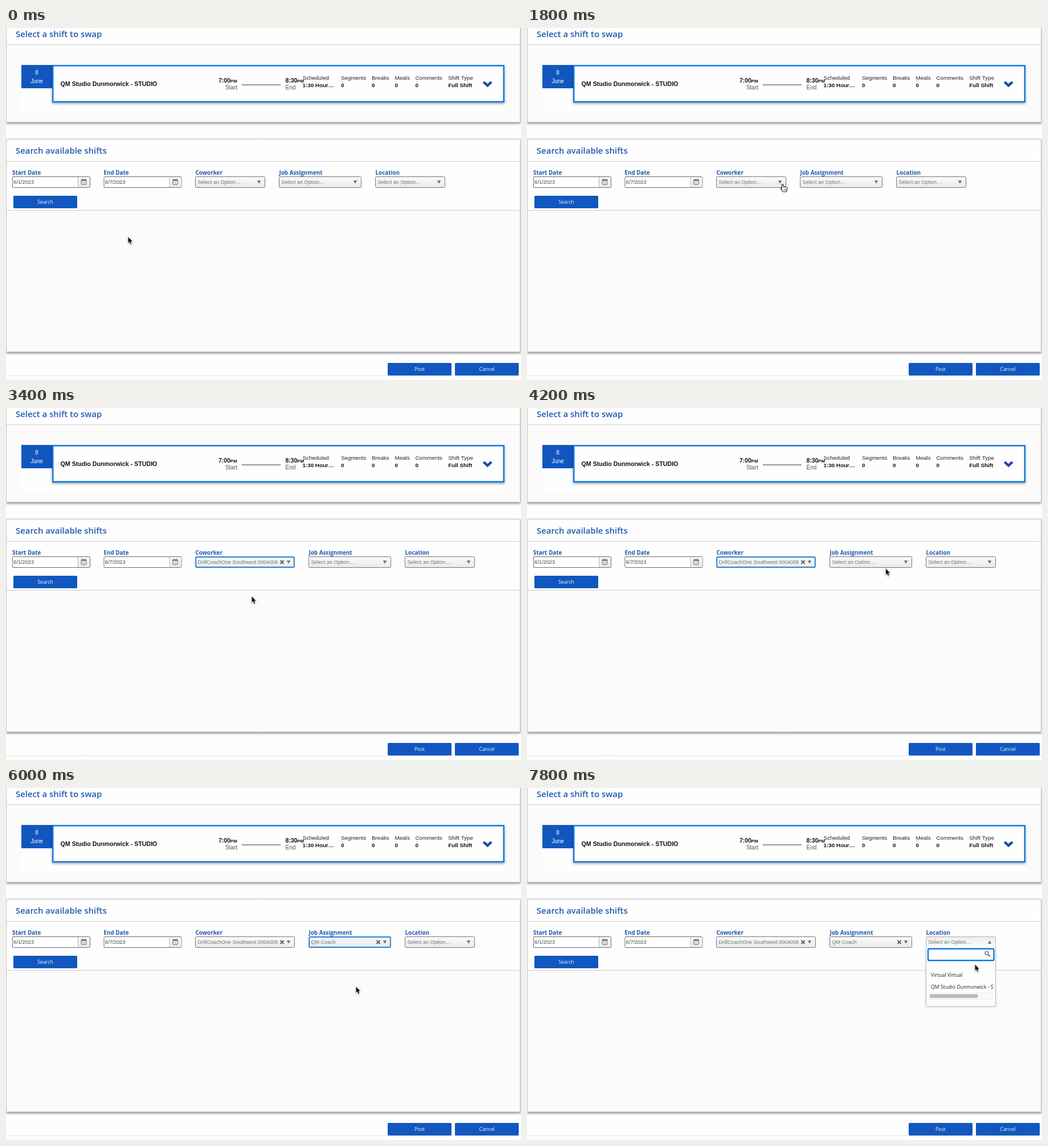
Write an HTML page with a canvas that moves like this. It is 904 px wide and 619 px high and loops after 8000 ms.

```html
<!DOCTYPE html>
<html lang="en">
<head>
<meta charset="utf-8">
<title>Shift swap</title>
<style>
html, body { margin: 0; width: 100%; height: 100%; overflow: hidden; background: #fefefe; }
canvas { display: block; width: 904px; height: 619px; }
</style>
</head>
<body>
<canvas id="stage"></canvas>
<script>
const W = 904, H = 619, LOOP = 8000, STEP = 200;
const canvas = document.getElementById('stage');
const ctx = canvas.getContext('2d');
const dpr = window.devicePixelRatio || 1;
canvas.width = W * dpr;
canvas.height = H * dpr;

const OPEN_SANS = '"Open Sans", "Noto Sans", sans-serif';
const ARIAL = '"Liberation Sans", Arial, sans-serif';
const BLUE = '#1157bf', FOCUS = '#0f7ae5', TITLE = '#2059b0';
const HINT = 'Select an Option…';

// When each list opens and when its option is picked
const TIMES = {
  coworker: { open: 2600, pick: 3400 },
  job: { open: 4400, pick: 6000 },
  place: { open: 7200, pick: LOOP }
};

// Pointer stops: time, x, y
const PATH = [
  [0, 214, 367], [1600, 449, 274], [1800, 449, 274], [2200, 448, 277], [2600, 448, 277],
  [3200, 431, 331], [3600, 431, 331], [4400, 666, 273], [5000, 666, 273],
  [5400, 614, 349], [6000, 614, 349], [7000, 812, 273], [7200, 812, 273], [7800, 786, 310]
];

function text(str, x, y, font, color, align = 'left') {
  ctx.font = font;
  ctx.fillStyle = color;
  ctx.textAlign = align;
  ctx.fillText(str, x, y);
}

function rect(x, y, w, h, color) {
  ctx.fillStyle = color;
  ctx.fillRect(x, y, w, h);
}

function box(x, y, w, h, r, fill, stroke, line = 1) {
  ctx.beginPath();
  ctx.roundRect(x, y, w, h, r);
  if (fill) { ctx.fillStyle = fill; ctx.fill(); }
  if (stroke) { ctx.strokeStyle = stroke; ctx.lineWidth = line; ctx.stroke(); }
}

function poly(points, fill, stroke, line = 1) {
  ctx.beginPath();
  points.forEach(([x, y]) => ctx.lineTo(x, y));
  if (fill) { ctx.closePath(); ctx.fillStyle = fill; ctx.fill(); }
  if (stroke) { ctx.strokeStyle = stroke; ctx.lineWidth = line; ctx.stroke(); }
}

function shade(y, h, top, bottom) {
  const g = ctx.createLinearGradient(0, y, 0, y + h);
  g.addColorStop(0, top);
  g.addColorStop(1, bottom);
  return g;
}

function shadowed(color, blur, dy, draw) {
  ctx.save();
  ctx.shadowColor = color;
  ctx.shadowBlur = blur * dpr;
  ctx.shadowOffsetY = dy * dpr;
  draw();
  ctx.restore();
}

function panel(y, bottom, headEnd, bodyStart, title, baseline) {
  shadowed('rgba(0,0,0,.45)', 4, 1.5, () => rect(0, y, 903, bottom - y, '#fefefe'));
  rect(0, bodyStart, 903, bottom - bodyStart, '#fbfbfb');
  box(.5, y + .5, 902, bottom - y - 1, 0, null, '#c4c4c4');
  rect(1, headEnd, 901, 1, '#cfcfcf');
  if (bodyStart !== headEnd) rect(1, bodyStart, 901, 1, '#cbcbcb');
  text(title, 17, baseline, `600 14.9px ${OPEN_SANS}`, TITLE);
}

function button(label, x, y, w = 112, h = 22) {
  box(x, y, w, h, 1.5, BLUE);
  text(label, x + w / 2, y + 14.2, `8.8px ${OPEN_SANS}`, '#f4f8ff', 'center');
}

function clock(time, x) {
  text(time, x, 96, `bold 10.3px ${ARIAL}`, '#111');
  text('PM', x + 20.6, 96, `bold 8px ${ARIAL}`, '#111');
}

function shiftCard() {
  rect(27, 66, 848, 81, '#fefefe');
  rect(27, 65, 54, 41, BLUE);
  text('8', 54, 82, `10px ${ARIAL}`, '#fff', 'center');
  text('June', 54, 97, `10px ${ARIAL}`, '#fff', 'center');

  shadowed('rgba(0,0,0,.4)', 4, 1.5, () => rect(81, 65, 794, 66, FOCUS));
  rect(83.5, 67.5, 789, 61, '#fefefe');
  text('QM Studio Dunmorwick - STUDIO', 95.5, 102, `bold 10.66px ${ARIAL}`, '#111');
  clock('7:00', 373);
  clock('8:30', 490.5);
  text('Start', 406, 107.5, `10px ${ARIAL}`, '#555', 'right');
  text('End', 490.5, 107.5, `10px ${ARIAL}`, '#555');
  rect(414, 99.5, 68, 1, '#333');

  const columns = [
    [520.5, 'Scheduled', '1:30 Hour…'], [588, 'Segments', '0'], [642, 'Breaks', '0'],
    [682.5, 'Meals', '0'], [718.5, 'Comments', '0'], [776.3, 'Shift Type', 'Full Shift']
  ];
  for (const [x, head, value] of columns) {
    text(head, x, 91, `9.8px ${ARIAL}`, '#222');
    text(value, x, 104, `bold 9.8px ${ARIAL}`, '#111');
  }
  poly([[838.3, 94.8], [845.2, 101.2], [852.1, 94.8]], null, '#1c4dab', 4.4);
}

function label(str, x) {
  text(str, x, 257.6, `bold 9.85px ${OPEN_SANS}`, TITLE);
}

function dateField(name, value, x) {
  label(name, x);
  box(x + .5, 261.5, 136, 19, 1.5, '#fefefe', '#6b6b6b');
  rect(x + 116, 262, 20, 18, shade(262, 18, '#f8f8f8', '#ebebeb'));
  rect(x + 115, 262, 1, 18, '#b5b5b5');
  text(value, x + 2.3, 274, `9.2px ${ARIAL}`, '#444');
  // calendar icon
  box(x + 121, 266.5, 9, 9, 1, '#f5f5f5', '#777');
  rect(x + 121, 267, 9, 2, '#777');
  rect(x + 122.5, 265, 1, 2, '#777');
  rect(x + 127.5, 265, 1, 2, '#777');
  for (let i = 0; i < 6; i++) {
    rect(x + 122.3 + (i % 3) * 2.4, 270.6 + (i > 2 ? 2.4 : 0), 1.5, 1.3, '#999');
  }
}

function triangle(x, y, dir) {
  poly([[x - 3.3, y - 2.7 * dir], [x + 3.3, y - 2.7 * dir], [x, y + 2.7 * dir]], '#707070');
}

function cross(x, y) {
  poly([[x - 3, y - 3], [x + 3, y + 3]], null, '#666', 2.2);
  poly([[x + 3, y - 3], [x - 3, y + 3]], null, '#666', 2.2);
}

function selectField(name, x, w, { value, focus, open }) {
  label(name, x + .5);
  const fill = open ? shade(261, 20, '#ececec', '#fdfdfd') : shade(261, 20, '#fbfbfb', '#e9e9e9');
  if (focus) box(x + 1.2, 262, w - 2.4, 18, 1.5, fill, '#2581d8', 2);
  else box(x + .5, 261.5, w - 1, 19, 2, fill, open ? '#b4b4b4' : '#757575');
  text(value || HINT, x + 4.5, 273.8, `9px ${ARIAL}`, '#747474');
  if (value) cross(x + w - 22.5, 271);
  triangle(x + w - 11, 271, open ? -1 : 1);
}

function dropdown(x, w, items, thumb, caret) {
  const bottom = thumb ? 384 : 372;
  shadowed('rgba(0,0,0,.15)', 3, 1, () => rect(x, 281, w, bottom - 281, '#fefefe'));
  box(x + .5, 280.5, w - 1, bottom - 280.5, 1.5, '#fefefe', '#bdbdbd');
  rect(x + 1, 280, w - 2, 1.5, '#fdfdfd');
  box(x + 4, 282.8, w - 7.5, 20.5, 2, '#fefefe', FOCUS, 2.4);
  if (caret) rect(x + 7, 287.5, 1, 11, '#333');

  const cx = x + w - 16;
  ctx.beginPath();
  ctx.arc(cx, 290.5, 3, 0, Math.PI * 2);
  ctx.strokeStyle = '#777';
  ctx.lineWidth = 1.5;
  ctx.stroke();
  poly([[cx + 2.2, 292.7], [cx + 6, 296.3]], null, '#777', 2.2);

  ctx.save();
  ctx.beginPath();
  ctx.rect(x + 1, 305, w - 4.5, 76);
  ctx.clip();
  items.forEach((item, i) =>
    text(item, x + 9, 332 + i * 20.5, `8.75px ${OPEN_SANS}`, '#222'));
  ctx.restore();

  if (thumb) {
    rect(x + 5, 360, w - 9, 11.5, '#f9f9f9');
    rect(x + 5, 360, w - 9, 1, '#ececec');
    rect(x + 5, 371, w - 9, 1, '#ececec');
    box(x + 6.5, 362.5, thumb, 6.8, 3.4, '#b9b9b9');
  }
}

function pointerAt(t) {
  const i = PATH.findIndex(p => p[0] > t);
  if (i < 0) return PATH[PATH.length - 1].slice(1);
  const [t0, x0, y0] = PATH[i - 1], [t1, x1, y1] = PATH[i];
  const u = (t - t0) / (t1 - t0), e = u * u * (3 - 2 * u);
  return [x0 + (x1 - x0) * e, y0 + (y1 - y0) * e];
}

function arrow(x, y) {
  ctx.save();
  ctx.translate(x, y);
  ctx.lineJoin = 'round';
  const shape = [[.5, .5], [.5, 11], [2.8, 8.9], [4.5, 12.8], [6.3, 12], [4.7, 8.2], [7.8, 8], [.5, .5]];
  shadowed('rgba(0,0,0,.35)', 2, 1, () => poly(shape, null, '#fff', 1.8));
  poly(shape, '#111');
  ctx.restore();
}

function hand(x, y) {
  ctx.save();
  ctx.translate(x, y);
  ctx.lineJoin = 'round';
  ctx.beginPath();
  ctx.moveTo(-1.4, 8);
  ctx.lineTo(-1.8, 1.6);
  ctx.quadraticCurveTo(-.6, -.4, .6, 1.6);
  ctx.lineTo(1, 5.4);
  ctx.quadraticCurveTo(2.4, 4.2, 3.4, 5.8);
  ctx.quadraticCurveTo(4.9, 4.8, 5.7, 6.3);
  ctx.quadraticCurveTo(7.6, 5.8, 7.8, 7.6);
  ctx.quadraticCurveTo(8, 10.5, 6.5, 12.3);
  ctx.lineTo(6.4, 14);
  ctx.lineTo(.4, 14);
  ctx.quadraticCurveTo(-1, 11.6, -3.6, 9);
  ctx.quadraticCurveTo(-3.6, 7, -1.4, 8);
  ctx.closePath();
  ctx.fillStyle = '#fff';
  ctx.fill();
  ctx.strokeStyle = '#222';
  ctx.lineWidth = 1.1;
  ctx.stroke();
  for (const lx of [1.6, 3.4, 5.2]) rect(lx, 9, .8, 3, '#555');
  ctx.restore();
}

function state({ open, pick }, t, value, next) {
  const picked = t >= pick;
  return {
    open: t >= open && !picked,
    value: picked ? value : '',
    focus: picked && t < next,
    caret: (t - open) % 1200 < 600
  };
}

function draw(t) {
  ctx.setTransform(dpr, 0, 0, dpr, 0, 0);
  rect(0, 0, W, H, '#fefefe');
  panel(-10, 166, 29, 29, 'Select a shift to swap', 16.2);
  shiftCard();
  panel(195, 570, 234, 320, 'Search available shifts', 220.8);

  dateField('Start Date', '6/1/2023', 11);
  dateField('End Date', '6/7/2023', 171.5);
  button('Search', 13, 295);

  const coworker = state(TIMES.coworker, t, 'DrillCoachOne Southwest 0004008', TIMES.job.open);
  const job = state(TIMES.job, t, 'QM Coach', TIMES.place.open);
  const place = state(TIMES.place, t, '', LOOP);
  const shift = coworker.value ? 52 : 0;
  const jobX = 479 + shift, placeX = 648 + shift;

  selectField('Coworker', 332, 123 + shift, coworker);
  selectField('Job Assignment', jobX, 145, job);
  selectField('Location', placeX, 123, place);
  if (coworker.open) {
    dropdown(332, 123, ['DrillCoachOne Southwest 0004008', 'DrillAdmMgr Southwest 0004009'], 82, coworker.caret);
  }
  if (job.open) dropdown(jobX, 145, ['QM Coach - Virtual', 'QM Coach'], 0, job.caret);
  if (place.open) {
    dropdown(placeX, 123, ['Virtual Virtual', 'QM Studio Dunmorwick - STUDIO'], 85, place.caret);
  }

  button('Post', 670, 589);
  button('Cancel', 788, 589);
  rect(0, 611, W, 1, '#dedede');
  rect(141, 617, 1, 1, '#bbb');

  const [x, y] = pointerAt(t);
  const overSelect = y > 261 && y < 281;
  (overSelect ? hand : arrow)(x, y);
}

function tick() {
  const t = performance.now() % LOOP;
  draw(Math.floor(t / STEP) * STEP);
  requestAnimationFrame(tick);
}
tick();
</script>
</body>
</html>
```
